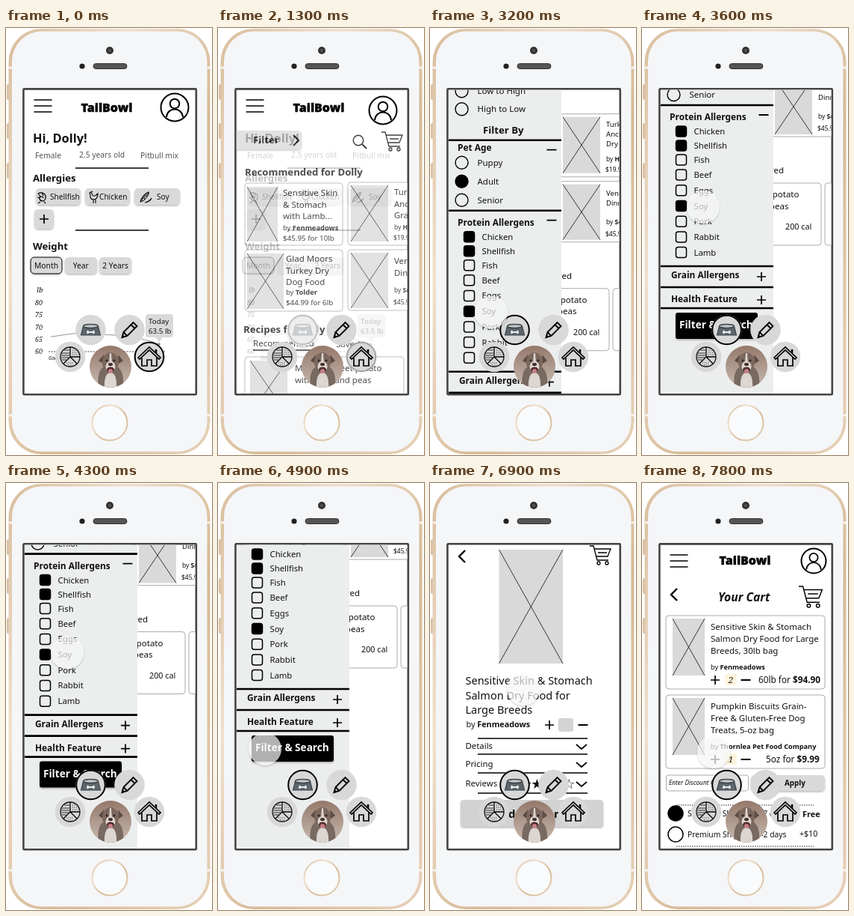
These frames come from a looping animation (276 by 570 pixels, 8000 ms). An HTML page:

```html
<!DOCTYPE html>
<html lang="en">
<head>
<meta charset="utf-8">
<title>Pet food app walkthrough</title>
<style>
html, body { margin: 0; width: 100%; height: 100%; overflow: hidden; background: #fff; }
svg { display: block; }
text { font-family: "Noto Sans", "Open Sans", sans-serif; fill: #111; white-space: pre; }
.b, .w { font-weight: 700; }
.w { fill: #fff; }
.m { font-weight: 500; }
.g { fill: #555; }
.i { font-family: "Noto Serif", serif; font-style: italic; }
.s { font-style: italic; }
.bi { font-weight: 700; font-style: italic; }
.logo { font-family: "Open Sans", sans-serif; font-weight: 800; fill: #000; stroke: #000; stroke-width: .4px; }
.mid { text-anchor: middle; }
</style>
</head>
<body>
<script>
const GRAY = '#d9d9d9';
const T = (x, y, s, size = 11.5, cls = '') =>
  `<text x="${x}" y="${y}" font-size="${size}" class="${cls}">${s.replace(/&/g, '&amp;')}</text>`;
const R = (x, y, w, h, fill, r = 0, more = '') =>
  `<rect x="${x}" y="${y}" width="${w}" height="${h}" rx="${r}" fill="${fill}" ${more}/>`;
const C = (x, y, r, fill = 'none', stroke = 'none', w = 1.5) =>
  `<circle cx="${x}" cy="${y}" r="${r}" fill="${fill}" stroke="${stroke}" stroke-width="${w}"/>`;
const P = (d, w = 1.5, stroke = '#000', fill = 'none', more = '') =>
  `<path d="${d}" fill="${fill}" stroke="${stroke}" stroke-width="${w}" ${more}/>`;
const at = (x, y, s, scale = 1) => `<g transform="translate(${x} ${y}) scale(${scale})">${s}</g>`;
const group = (id, s) => `<g id="${id}">${s}</g>`;
const lines = (x, y, gap, size, rows) => rows.map((s, i) => T(x, y + i * gap, s, size)).join('');

const plus = (x, y, r = 6) => P(`M${x - r} ${y}h${2 * r}M${x} ${y - r}v${2 * r}`, 1.7);
const minus = (x, y, r = 6.5) => P(`M${x - r} ${y}h${2 * r}`, 1.8);
const back = (x, y) => P(`M${x + 4} ${y - 8}l-8 8l8 8`, 2.4);
const chip = (x, y, w, h) => R(x, y, w, h, GRAY, 5, 'filter="url(#soft)"');
const card = (x, y, w, h) => R(x, y, w, h, '#fff', 4, 'stroke="#aaa"');
const blank = (x, y, w, h) => R(x, y, w, h, GRAY) + P(`M${x} ${y}l${w} ${h}M${x + w} ${y}l${-w} ${h}`, .9, '#222');
const byline = (x, y, name, size = 9.4) => T(x, y, `by <tspan font-weight="700">${name}</tspan>`, size);
const search = (x, y, w = 1.4) => C(x, y, 6.8, 'none', '#000', w) + P(`M${x + 5} ${y + 5}l6 6`, w + .5);
const basket = (x, y, k = 1) => at(x, y,
  P('M0 0h5l5 19h15M6 4h22l-4 10H9M11 9h12', 1.3)
  + C(12, 23, 2, 'none', '#000', 1.3) + C(23, 23, 2, 'none', '#000', 1.3), k);
const header = (x, y, ax, ay, ar) =>
  P('M37.5 96h24m-24 8h24m-24 8h24', 1.3) + T(x, y, 'TailBowl', 16, 'logo mid')
  + C(ax, ay, ar, '#fff', '#000', 2)
  + at(ax, ay, C(0, -5, 6.3, 'none', '#000', 2) + P('M-11 13C-10 -1 10 -1 11 13', 2), ar / 18.5);
const filterTab = R(18, 137, 94, 25, GRAY, 5, 'filter="url(#soft)"') + T(47, 154, 'Filter', 13.2, 'b')
  + P('M101 143l7 7l-7 7', 2.2);

// Pages
const allergen = (x, y, w, name, icon) => chip(x, y, w, 22) + icon
  + T(x + 19 + (name === 'Soy' ? 11 : 0), y + 15, name, 10.1, 'm');
const curls = at(49, 226, P('M-6 -5c6 -3 11 1 10 6s-7 5 -8 1s4 -4 5 -1M-6 -5l3 4M-7 0l4 1M-3 6l-3 2M2 6l2 2M-1 -6l2 4', 1.2));
const hen = at(117, 226, P('M-5 -6l2 -1l2 4c2 3 5 0 7 -2c0 6 -2 8 -6 8c-5 0 -4 -5 -4 -6zM0 3v5M3 3v5M-3 -7l2 -1', 1.1));
const pods = at(187, 226, P('M-7 6c1 -5 6 -11 11 -13c2 2 -6 13 -11 13zM-1 7c4 0 8 -3 9 -6', 1.1, '#000', '#777')
  + C(0, 0, 1.5, '#fff', '#000', .7) + C(-3, 3, 1.5, '#fff', '#000', .7));

const profileHead = header(135, 112, 226, 106, 18.5);
const profile = T(36, 153, 'Hi, Dolly!', 16.4, 'b')
  + T(39, 174, 'Female', 10.3, 'g') + T(98, 173, '2.5 years old', 10.3, 'g') + T(180, 174, 'Pitbull mix', 10.3, 'g')
  + P('M93 187h98M93 270h98') + T(36, 205, 'Allergies', 13.2, 'b')
  + allergen(40, 214, 60, 'Shellfish', curls) + allergen(106, 214, 60, 'Chicken', hen) + allergen(172, 214, 61, 'Soy', pods)
  + chip(38, 242, 26, 26) + plus(51, 255) + T(36, 296, 'Weight', 13.2, 'b')
  + chip(33, 306, 42, 22) + R(33, 306, 42, 22, 'none', 5, 'stroke="#000"') + chip(79, 306, 43, 22) + chip(125, 306, 43, 22)
  + ['Month', 'Year', '2 Years'].map((s, i) => T(54 + 46.3 * i, 321, s, 10.3, 'm mid')).join('')
  + T(41, 353, 'lb', 9.5, 'i')
  + [80, 75, 70, 65, 60].map((n, i) => T(39, 370 + 16.3 * i, '' + n, 9, 'i')).join('')
  + P('M60 412C80 410 90 406 113 408S170 409 205 422', .8, '#777')
  + P('M57 432H213', .9, '#333', 'none', 'stroke-dasharray="2 1.5"') + T(57, 443, 'Goal', 6.5, 's')
  + R(187, 382, 37, 31, GRAY, 4) + P('M200 412h10l-5 8z', 0, 'none', GRAY) + C(205, 422, 1.8, '#888')
  + T(191, 395, 'Today', 9.8, 'm') + T(191, 408, '63.5 lb', 9.8, 'm');

const recommended = T(36, 197, 'Recommended for Dolly', 13.2, 'b');
const shelf = (dx, size, gap, turkey) =>
  card(36, 207, 131, 83) + blank(39, 212, 41, 73)
  + lines(87, 224, 15.7, 11.5, ['Sensitive Skin', '& Stomach', 'with Lamb...'])
  + byline(87, 270, 'Fenmeadows') + T(87, 284, '$45.95 for 10lb', 9.8, 'm')
  + card(174, 206, 90, 84) + blank(178, 210, 50, 75)
  + lines(236, 223, gap, size, turkey) + byline(236, 269, 'Harl', 8.5) + T(235, 283, '$19.95', 8.5, 'm')
  + card(36, 296, 131, 82) + blank(39, 301, 49, 74)
  + lines(91, 312, 15.6, 11.5, ['Glad Moors', 'Turkey Dry', 'Dog Food'])
  + byline(91, 356, 'Tolder') + T(91, 370, '$44.99 for 6lb', 9.8, 'm')
  + card(174, 296, 90, 81) + blank(178, 300, 50, 74)
  + lines(236, 315, gap, size, ['Venison', 'Dinner']) + byline(236, 353, 'Sorl', 8.5) + T(235, 369, '$45.95', 8.5, 'm')
  + T(34, 407, 'Recipes for Dolly', 13.2, 'b')
  + T(47, 425, 'Recommended', 11.5) + P('M47 430h83', 1.3) + T(158, 426, 'Saved', 11.5)
  + at(dx, 0, card(36, 439, 213, 83) + blank(43, 444, 50, 72) + card(254, 439, 90, 83)
    + lines(103, 458, 15.5, 11.5, ['Mashed sweet potato', 'with beef and peas']) + T(201, 501, '200 cal', 10.8));

const storeHead = header(135, 112, 221, 110, 18.5);
const store = filterTab + search(188, 150) + basket(219, 139) + recommended
  + shelf(0, 11.3, 15.5, ['Turkey', 'Ancient', 'Grains']);

const radio = (y, s, on) => C(42.5, y, 8.5, on ? '#000' : 'none', '#000', 1.4) + T(63.5, y + 4, s, 11.5);
const check = (y, s, on) => R(45.5, y - 7, 14, 14, on ? '#000' : 'none', 3, 'stroke="#000" stroke-width="1.5"') + T(69.5, y + 4, s, 11.3);
const rule = (...ys) => P(ys.map(y => `M25 ${y}h151`).join(''), 2.6);
const panel = header(143, 109, 228, 107, 16.5) + search(190.5, 151, 1.9) + basket(219, 140)
  + shelf(-9, 9.6, 13, ['Turkey', 'Ancient', 'Dry Food'])
  + R(25, 121, 151, 800, '#eceeee')
  + T(86, 147, 'Sort', 13.2, 'b') + back(161, 141) + T(37, 160, 'Price', 11.6, 'b')
  + radio(175.5, 'Low to High') + radio(199.5, 'High to Low') + T(71, 232, 'Filter By', 13.2, 'b')
  + rule(241, 335, 550, 578, 606) + T(37, 255.5, 'Pet Age', 11.9, 'b') + minus(163, 254)
  + radio(271, 'Puppy') + radio(296, 'Adult', 1) + radio(321, 'Senior')
  + T(37, 355, 'Protein Allergens', 11.9, 'b') + minus(163, 348)
  + ['Chicken', 'Shellfish', 'Fish', 'Beef', 'Eggs', 'Soy', 'Pork', 'Rabbit', 'Lamb']
    .map((s, i) => check(370 + (i < 3 ? 19 * i : 20.7 * i - 4), s, i < 2 || i === 5)).join('')
  + T(39, 566, 'Grain Allergens', 11.9, 'b') + plus(160, 564) + T(39, 598, 'Health Feature', 11.9, 'b') + plus(160, 595)
  + R(45, 612, 110, 35, '#000', 3, 'filter="url(#soft)"') + T(50, 633, 'Filter & Search', 13.6, 'w');

const item = (y, title, brand, price) => card(32, y, 213, 98) + blank(41, y + 4, 43, 76)
  + lines(92, y + 19, 16, 11.5, title) + byline(92, y + 71.5, brand, 9.2) + price;
const salmon = ['Sensitive Skin & Stomach', 'Salmon Dry Food for Large', 'Breeds, 30lb bag'];
const results = header(138, 109, 230, 104, 16.5) + filterTab + search(188, 150) + basket(212, 139) + recommended
  + item(207, salmon, 'Fenmeadows', T(92, 296, '$47.45 for 30lb', 9.8, 'm'))
  + item(313, ['Glad Moors Turkey Dry', 'Dog Food'], 'Tolder', T(92, 402, '$44.99 for 6lb', 9.8, 'm'));

const row = (y, s) => T(47.5, y, s, 11.4, 'm') + P(`M196 ${y - 6}l7 6l7 -6`, 1.8);
const product = header(138, 109, 230, 104, 16.5) + back(43, 152) + basket(214, 138)
  + blank(92.5, 143, 85.5, 152)
  + lines(47.5, 323, 19.5, 14.5, ['Sensitive Skin & Stomach', 'Salmon Dry Food for', 'Large Breeds'])
  + byline(48.5, 380, 'Fenmeadows', 10.8) + plus(160, 377) + R(172, 368, 20, 18, '#d3d3d3', 3) + minus(205, 377)
  + P('M64 395h147m-147 21h147m-147 25h147m-147 27h147', 1.5)
  + row(409, 'Details') + row(433, 'Pricing') + row(459, 'Reviews')
  + ['★', '★', '★', '★', '☆'].map((s, i) => T(129 + 14.3 * i, 462, s, 18, 'mid')).join('')
  + R(41, 477, 191, 36, '#d2d2d2', 4, 'filter="url(#soft)"') + T(137, 501, 'Add to Cart', 15, 'b mid');

const amount = (y, n, x, size, price) => plus(98, y) + R(111, y - 8, 16, 15, '#fff5dc', 2)
  + T(119, y + 4, n, 11.5, 'i mid') + minus(139, y)
  + T(x, y + 4, `${size} for <tspan font-weight="700">${price}</tspan>`, 11.8);
const dots = y => P(`M46 ${y}h184`, 1, '#222', 'none', 'stroke-dasharray="1.5 1.5"');
const cart = header(138, 109, 230, 104, 16.5) + back(43, 149) + basket(210, 138, 1.12)
  + T(102, 158, 'Your Cart', 15.7, 'bi')
  + item(177, salmon, 'Fenmeadows', amount(263, '2', 156, '60lb', '$94.90'))
  + item(283, ['Pumpkin Biscuits Grain-', 'Free & Gluten-Free Dog', 'Treats, 5-oz bag'], 'Thornlea Pet Food Company',
    amount(369, '1', 166, '5oz', '$9.99'))
  + R(32.5, 390, 110, 21, '#fff', 3, 'stroke="#aaa"') + T(36, 403, 'Enter Discount Code', 8.3, 's')
  + chip(146, 390, 99, 21) + T(191, 404, 'Apply', 9.8, 'b')
  + dots(430) + dots(485) + C(45, 441, 10, '#000', '#000') + C(45, 469, 10, '#fff', '#000')
  + T(61, 445, 'Standard Shipping 5-7 days', 10.3, 'm') + T(215, 446, 'Free', 11, 'b')
  + T(61, 473, 'Premium Shipping 1-2 days', 10.3, 'm') + T(211, 472, '+$10', 10.6, 'm');

// Floating menu
const disc = (x, y, icon) => C(x, y, 20.3, '#d8d8d8') + at(x, y, icon);
const pie = C(0, 0, 13, 'none', '#111', 1.3) + P('M0 -13V0H13M0 0l9 9M0 0l-9 9', 1.3)
  + P('M-11 -5h10m-11 3h11m-11 3h10m-9 3h6M-8 -9h7', .8)
  + P('M3 -9h8m-8 3h9m-9 3h9M-5 8h10m-8 3h6', 1, '#333', 'none', 'stroke-dasharray="1 1.5"');
const bowl = P('M-10 -5H10L13 7H-13Z', 1.2, '#3f464b', '#5d666c')
  + '<ellipse cy="-5" rx="10" ry="2.6" fill="#c4c8ca" stroke="#3f464b" stroke-width="1.5"/>'
  + P('M-4 3H4', 2, '#eee') + [[-4, 2], [-4, 4], [4, 2], [4, 4]].map(p => C(...p, 1.3, '#eee')).join('');
const pencil = P('M-10 10l2 -7L5 -10l5 5L-3 8zM-8 3l5 5M2 -7l5 5', 1.9) + P('M-10 10l1 -3l2 2z', 1, '#000', '#000');
const house = P('M-15 1L0 -13L15 1l-2 2L0 -9L-13 3zM-10 1V12H-3V4H3V12H10V1', 1.7) + P('M9 -10v5', 2.5);
const dog = at(140, 452, C(0, 0, 28, 'url(#rug)') + '<g clip-path="url(#round)">'
  + P('M-16 30C-19 6 -12 -2 0 -2S19 6 17 30z', 0, 'none', '#786a61') + P('M-8 30C-9 14 -5 8 0 8S9 14 8 30z', 0, 'none', '#ddd5cf')
  + P('M-9 -16L-16 -8L-10 -4zM10 -16L17 -8L11 -4z', 0, 'none', '#5c4b43')
  + '<ellipse cy="-6" rx="11" ry="13" fill="#7a675d"/><ellipse cy="0" rx="6.5" ry="7" fill="#dfd5ce"/>'
  + P('M-1 -18h2L2 -3h-4z', 0, 'none', '#dfd5ce') + C(-5, -8, 1.4, '#2a2220') + C(5, -8, 1.4, '#2a2220')
  + '<ellipse cy="-3" rx="3" ry="2" fill="#3a2e2c"/><ellipse cy="4" rx="5" ry="3.5" fill="#4e2c2e"/><ellipse cy="6" rx="3" ry="3" fill="#c98087"/></g>');
const nav = disc(86, 439, pie) + disc(113.5, 403, bowl) + disc(165.5, 403, pencil) + disc(192, 439, house) + dog
  + group('homeRing', C(192, 439, 19.3, 'none', '#000', 2)) + group('bowlRing', C(113.5, 403, 19.3, 'none', '#000', 2));

const phone = [75, 127, 180].map(y => R(1, y, 5, 21, '#d8c0a4', 2)).join('')
  + R(3.5, 1, 270, 568, 'url(#gold)', 44) + R(8, 4.5, 261.5, 561, '#f5f6f8', 40)
  + P('M4 53h4M269.5 53h4M4 517h4M269.5 517h4', 3, '#f8f4ef')
  + C(139, 30, 5, '#333') + C(139, 30, 2, '#555') + C(102, 51, 3.6, '#222') + R(117, 47.5, 45, 7, '#555', 3.5, 'stroke="#333"')
  + C(139, 527, 23.5, '#f9fafb', 'url(#gold)', 2) + R(23.4, 81.4, 231.4, 407.8, '#fff', 1, 'stroke="#444" stroke-width="2.6"');

const pages = { profile, store, panel, results, product, cart };
const heads = { profileHead, storeHead };
const layers = (set, height) => Object.entries(set).map(([id, s]) => group(id, R(25, 83, 228, height, '#fff') + s)).join('');
document.body.innerHTML = `<svg width="276" height="570" viewBox="0 0 276 570"><defs>
<linearGradient id="gold" x2="1" y2="1"><stop stop-color="#d9bd9c"/><stop offset=".3" stop-color="#f0e0cd"/><stop offset=".6" stop-color="#d6b995"/><stop offset="1" stop-color="#e6d0b6"/></linearGradient>
<linearGradient id="rug" x2="0" y2="1"><stop stop-color="#94796a"/><stop offset="1" stop-color="#c9bab0"/></linearGradient>
<filter id="soft" x="-20%" y="-20%" width="140%" height="150%"><feDropShadow dx="0" dy="1.5" stdDeviation="1" flood-opacity=".28"/></filter>
<clipPath id="screen"><rect x="24.7" y="82.7" width="228.8" height="405.2"/></clipPath>
<clipPath id="round"><circle r="28"/></clipPath></defs>${phone}
<g clip-path="url(#screen)">${layers(pages, 900)}${layers(heads, 47)}${nav}</g>
<g id="touch"><circle r="21.5" fill="#fff" fill-opacity=".66" stroke="#fff" stroke-opacity=".5" filter="url(#soft)"/></g></svg>`;

// Motion: each key is [ms, value, value...]
const ramp = (t, a, b) => Math.min(1, Math.max(0, (t - a) / (b - a)));
function track(t, keys) {
  const i = keys.findIndex(k => k[0] > t);
  if (i < 1) return keys.at(i).slice(1);
  const [a, b] = [keys[i - 1], keys[i]], p = ramp(t, a[0], b[0]), e = p * p * (3 - 2 * p);
  return a.slice(1).map((v, j) => v + (b[j + 1] - v) * e);
}
const touchKeys = [[100, 182, 461], [200, 182, 523], [300, 182, 523], [400, 192, 529], [900, 114, 403], [1400, 114, 403],
  [1900, 106, 232], [2300, 84, 155], [2600, 84, 155], [2800, 82, 471], [2900, 82, 471], [3600, 82, 239], [3700, 82, 239],
  [3900, 82, 237], [4200, 82, 237], [4500, 82, 196], [4900, 63, 355], [5100, 63, 355], [5500, 125, 329], [6800, 125, 329],
  [6900, 125, 275], [7000, 124, 284], [7100, 124, 284], [7500, 96, 359]];
const panelKeys = [[2900, 0], [3600, 232], [3700, 232], [3900, 234], [4200, 234], [4600, 275]];
const productKeys = [[6800, 0], [6900, 54], [7000, 130]];

const el = id => document.getElementById(id);
const move = (id, x, y) => el(id).setAttribute('transform', `translate(${x} ${y})`);
const fade = (id, v) => { el(id).style.opacity = v; el(id).style.display = v ? '' : 'none'; };

function draw(now) {
  const t = Math.floor(now % 8000 / 100) * 100;
  const toStore = ramp(t, 1000, 1400);
  fade('profile', +(t < 1500));
  fade('profileHead', +(t < 1100));
  fade('store', t < 2600 ? toStore : 0);
  fade('storeHead', +(t >= 1100 && t < 2600));
  fade('panel', +(t >= 2600 && t < 5500));
  fade('results', t < 6100 ? ramp(t, 5100, 5500) : 0);
  fade('product', +(t >= 6100 && t < 7800));
  fade('cart', +(t >= 7800));
  fade('homeRing', 1 - toStore);
  fade('bowlRing', toStore);
  fade('touch', +(t >= 100));
  move('panel', 0, -track(t, panelKeys)[0]);
  move('product', 0, -track(t, productKeys)[0]);
  move('touch', ...track(t, touchKeys));
  requestAnimationFrame(draw);
}
requestAnimationFrame(draw);
</script>
</body>
</html>
```
